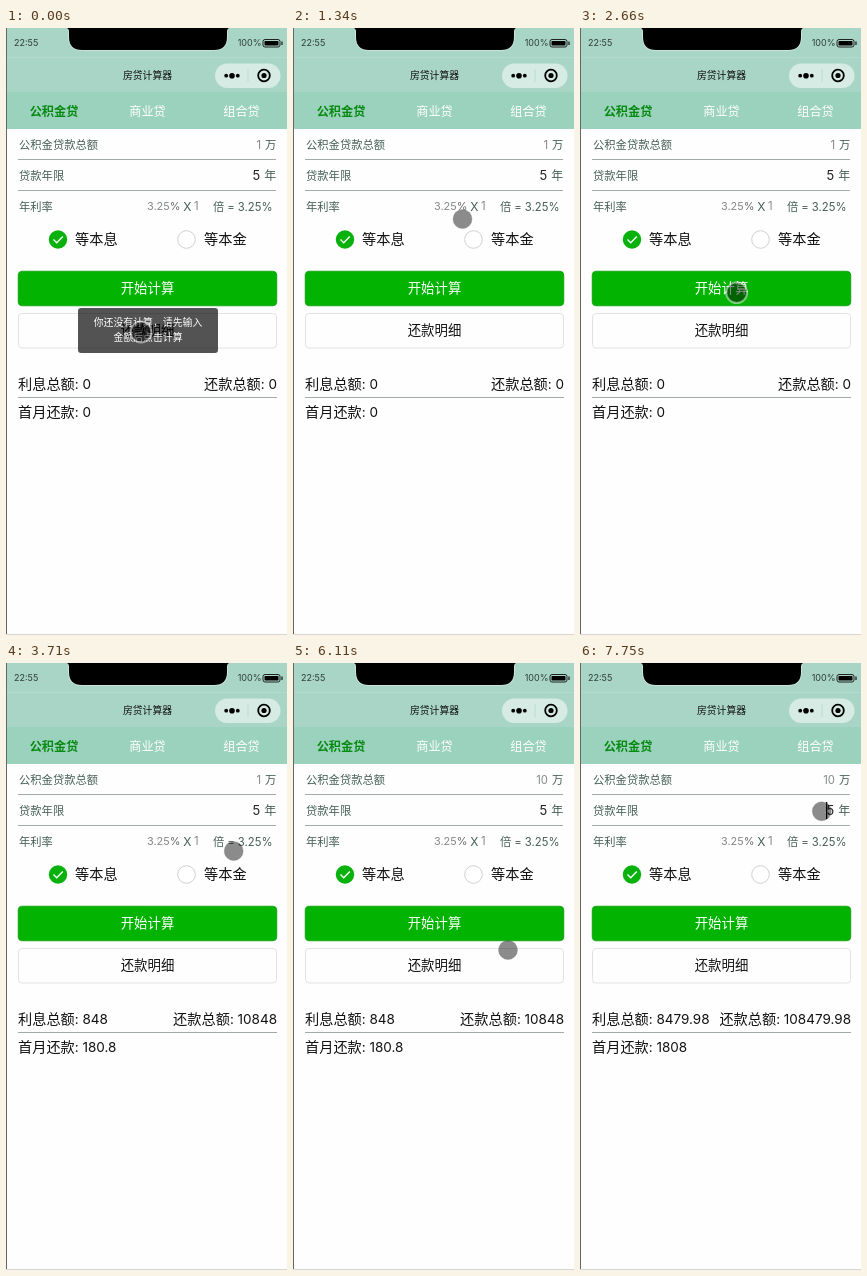
These frames come from a looping animation (281x607 px, 8000 ms). An HTML page:

```html
<!DOCTYPE html>
<html lang="zh-CN">
<head>
<meta charset="utf-8">
<title>房贷计算器</title>
<style>
html, body { margin: 0; width: 100%; height: 100%; overflow: hidden; background: #fefefe; }
svg { display: block; }
text { font: 14.2px "Noto Sans CJK SC", "Noto Sans CJK", sans-serif; fill: #111; }
.num { font-family: Inter, sans-serif; font-size: 13.5px; }
.status { font: 9px Inter, sans-serif; fill: #2f3d38; }
.mid { text-anchor: middle; }
.end { text-anchor: end; }
.tab { font-size: 12.2px; font-weight: 500; fill: #fff; }
.active { font-weight: 700; fill: #078a10; }
.row, .row .num { font-size: 11.3px; fill: #455f56; }
.row .faint { fill: #858988; }
.row .focused { fill: #222; }
.button { font-size: 13.4px; }
.toast { font-size: 9.9px; fill: #fff; }
.rule { stroke: #a3aba8; }
</style>
</head>
<body>
<svg width="281" height="607" viewBox="0 0 281 607">
  <rect width="281" height="607" fill="#fefefe"/>
  <rect width="281" height="64" fill="#a8d5c5"/>
  <rect y="64" width="281" height="37" fill="#9bd2be"/>
  <path d="M0 29.5H281" stroke="#b3dacd"/>
  <path d="M60 0Q63 0 63 4V9Q63 22 76 22H208Q221 22 221 9V4Q221 0 224 0Z" stroke="#d3eae1" stroke-width="1.6" paint-order="stroke"/>
  <text class="status" x="8" y="18">22:55</text>
  <text class="status" x="231.7" y="18">100%</text>
  <rect x="257" y="11.5" width="17" height="7.5" rx="2" fill="none" stroke="#222"/>
  <rect x="258.5" y="13" width="14" height="4.5" rx=".7"/>
  <path d="M276 13.5V17" stroke="#222" stroke-width="1.3"/>
  <text class="mid" x="141.5" y="50.6" style="font-size:9.8px">房贷计算器</text>

  <rect x="209" y="35.5" width="65.5" height="24.5" rx="12.2" fill="#d5ebe3"/>
  <path d="M242 41V54" stroke="#c0dcd1"/>
  <circle cx="220.2" cy="47.7" r="1.9"/><circle cx="226" cy="47.7" r="2.8"/><circle cx="231.8" cy="47.7" r="1.9"/>
  <circle cx="258" cy="47.5" r="5.8" fill="none" stroke="#000" stroke-width="1.8"/><circle cx="258" cy="47.5" r="2.6"/>

  <text class="tab active mid" x="48" y="87.5">公积金贷</text>
  <text class="tab mid" x="141.5" y="87.5">商业贷</text>
  <text class="tab mid" x="235.5" y="87.5">组合贷</text>

  <g class="row">
    <text class="row" x="13" y="121.3">公积金贷款总额</text>
    <text id="amount" class="num faint end" x="255" y="121">1</text>
    <text class="row end" x="270.3" y="121.3">万</text>
    <text class="row" x="13" y="151.8">贷款年限</text>
    <text class="num end" x="254.3" y="152" style="font-size:13px;fill:#222">5</text>
    <text class="row end" x="270.3" y="151.8" style="font-size:12px">年</text>
    <text class="row" x="13" y="182.6">年利率</text>
    <text class="num faint" x="141" y="182" style="font-size:10.9px">3.25<tspan fill="#666">%</tspan></text>
    <text class="num" x="177.3" y="183.3" style="font-size:12px">X</text>
    <text class="num faint" x="188" y="182">1</text>
    <text class="row" x="207" y="182.6">倍</text>
    <text class="num end" x="266.5" y="182.5">= 3.25%</text>
  </g>
  <path class="rule" d="M12 131.5H270M12 162.5H270M12 369.5H271"/>

  <circle cx="52" cy="211.5" r="9.2" fill="#09b10c"/>
  <path d="M47.5 211.5L50.7 214.8L56.8 208.5" fill="none" stroke="#fff" stroke-width="1.3"/>
  <text x="69" y="216.2">等本息</text>
  <circle cx="180.5" cy="211.5" r="8.8" fill="#fff" stroke="#d0d0d0"/>
  <text x="198" y="216.2">等本金</text>

  <rect x="12.2" y="243.2" width="258.6" height="34.6" rx="4" fill="#02b302" stroke="#029702" stroke-width=".7"/>
  <text class="button mid" x="141.5" y="265.2" style="fill:#fff">开始计算</text>
  <rect x="12.5" y="285.5" width="258" height="34.5" rx="3.5" fill="#fefefe" stroke="#e2e2e2"/>
  <text class="button mid" x="141.5" y="307.3">还款明细</text>

  <text x="12" y="361">利息总额<tspan id="interest" class="num"></tspan></text>
  <text class="end" x="271" y="361">还款总额<tspan id="total" class="num"></tspan></text>
  <text x="12" y="389">首月还款<tspan id="monthly" class="num"></tspan></text>

  <g id="toast">
    <rect x="72" y="280" width="140" height="45" rx="3" fill="#000" fill-opacity=".67"/>
    <text class="toast mid" x="142" y="298.2">你还没有计算，请先输入</text>
    <text class="toast mid" x="142" y="313">金额后点击计算</text>
  </g>
  <rect id="caret" width="1.3"/>
  <circle id="pointer" fill="#000" fill-opacity=".45"/>
  <path d="M.5 0V607" stroke="#666"/>
  <path d="M0 606.5H281" stroke="#d5d5d5"/>
</svg>
<script>
const LOOP = 8000, TICK = 149;
const el = id => document.getElementById(id);
const pointer = el('pointer'), caret = el('caret'), amount = el('amount');

// Pointer path: [tick, x, y]
const path = [
  [0, 135, 304], [3, 135, 304], [5, 128, 280], [6, 120, 260], [7, 115, 270], [8, 115, 270],
  [9, 169.5, 191], [10, 168, 281], [11, 168, 281], [18, 156.7, 264.7], [22, 156.7, 264.7],
  [25, 227.7, 188], [27, 254, 107], [28, 245.3, 116.5], [38, 245.3, 116.5],
  [41, 215, 287], [43, 178.3, 265.3], [47, 178.3, 265.3], [50, 241.8, 148.3], [60, 241.8, 148.3]
];
const within = (k, ...spans) => spans.some(([from, to]) => k >= from && k < to);

function pointAt(k) {
  const i = path.findIndex(p => p[0] > k);
  const [a, ax, ay] = path[i - 1], [b, bx, by] = path[i];
  const f = (k - a) / (b - a);
  return [ax + (bx - ax) * f, ay + (by - ay) * f];
}

function setAttrs(node, attrs) {
  for (const name in attrs) node.setAttribute(name, attrs[name]);
}

function draw(t) {
  const k = Math.floor((t + 25) / TICK); // the screen updates in steps
  const [cx, cy] = pointAt(k);
  const pressed = within(k, [0, 4], [17, 23], [43, 48]);
  setAttrs(pointer, {
    cx, cy, r: pressed ? 10.4 : 9.5,
    stroke: pressed ? '#fff' : '#777',
    'stroke-opacity': pressed ? .48 : .4,
    'stroke-width': pressed ? 2 : .8
  });

  const onYears = k >= 50;
  setAttrs(caret, {
    x: onYears ? 246 : 253.7, y: onYears ? 139 : 109, height: onYears ? 17 : 15,
    opacity: +within(k, [28, 30], [33, 36], [52, 55])
  });

  const [interest, total, monthly] =
    k < 20 ? [0, 0, 0] : k < 44 ? [848, 10848, 180.8] : [8479.98, 108479.98, 1808];
  el('interest').textContent = ': ' + interest;
  el('total').textContent = ': ' + total;
  el('monthly').textContent = ': ' + monthly;
  amount.textContent = k < 36 ? 1 : 10;
  amount.classList.toggle('focused', within(k, [28, 39]));
  el('toast').setAttribute('opacity', Math.max(0, Math.min(1, (6 - k) / 3)));
}

function loop() {
  draw(performance.now() % LOOP);
  requestAnimationFrame(loop);
}
loop();
</script>
</body>
</html>
```
